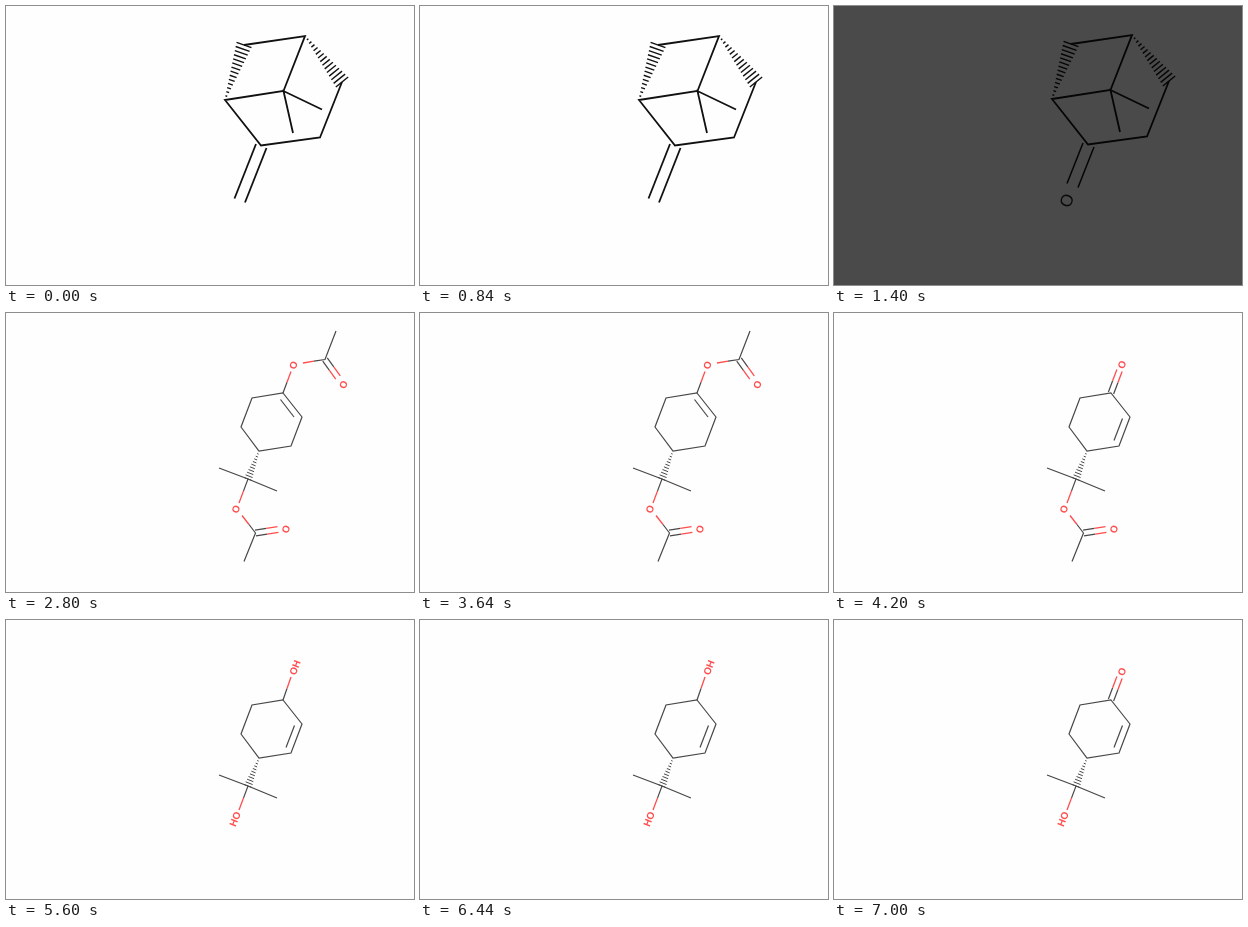
An HTML page with a canvas that plays this animation: 408 px wide and 279 px high, repeating every 8 s.

```html
<!DOCTYPE html>
<html lang="en">
<head>
<meta charset="utf-8">
<title>Molecules</title>
<style>
html, body { margin: 0; width: 100%; height: 100%; overflow: hidden; background: #fefefe; }
canvas { display: block; }
</style>
</head>
<body>
<canvas id="stage" width="408" height="279"></canvas>
<script>
const ctx = document.getElementById('stage').getContext('2d');
const RED = '#ff4d4d', GREY = '#484848';
const TILT = -1.2;

const mix = (a, b, t) => [a[0] + (b[0] - a[0]) * t, a[1] + (b[1] - a[1]) * t];

function normal(a, b) {
  const length = Math.hypot(b[0] - a[0], b[1] - a[1]);
  return [(a[1] - b[1]) / length, (b[0] - a[0]) / length];
}

function path(points, color, width, close) {
  ctx.beginPath();
  points.forEach(p => ctx.lineTo(...p));
  if (close) ctx.closePath();
  ctx.strokeStyle = color;
  ctx.lineWidth = width;
  ctx.stroke();
}

// Bond whose second half is red, drawn once or as a pair of lines.
function redBond(a, b, gap = 0) {
  const [nx, ny] = normal(a, b);
  for (const side of gap ? [-gap, gap] : [0]) {
    const [p, q] = [a, b].map(([x, y]) => [x + nx * side, y + ny * side]);
    const middle = mix(p, q, 0.5);
    path([p, middle], GREY, 1.2);
    path([middle, q], RED, 1.3);
  }
}

// Hashed wedge widening from a to b.
function wedge(a, b, count, half, color, width) {
  const [nx, ny] = normal(a, b);
  for (let i = 1; i <= count; i++) {
    const [x, y] = mix(a, b, i / count), r = 0.4 + half * i / count;
    path([[x - nx * r, y - ny * r], [x + nx * r, y + ny * r]], color, width);
  }
}

function label(text, x, y, color = RED, size = 10, weight = 'bold') {
  ctx.save();
  ctx.translate(x, y);
  ctx.rotate(TILT);
  ctx.font = `${weight} ${size}px "Liberation Sans", sans-serif`;
  ctx.textAlign = 'center';
  ctx.fillStyle = color;
  ctx.fillText(text, 0, size * 0.35);
  ctx.restore();
}

function bicycle(color) {
  const a = [238, 39], b = [299, 30], c = [336, 76], d = [314, 131.5],
        e = [255, 139.5], f = [219, 94], g = [277.5, 85];
  path([a, b, g, f, e, d, c], color, 1.8);
  path([[316, 103.5], g, [287, 127]], color, 1.8);
  wedge(f, a, 14, 7.5, color, 1.4);
  wedge(b, c, 14, 7.5, color, 1.4);
}

function methylene() {
  bicycle('#111');
  path([[250, 138], [228.5, 192.5]], '#111', 1.8);
  path([[260.5, 142], [239, 196.5]], '#111', 1.8);
}

function darkKetone() {
  ctx.fillStyle = '#4a4a4a';
  ctx.fillRect(0, 0, 408, 279);
  ctx.save();
  ctx.translate(-1, -1);
  bicycle('#050505');
  ctx.restore();
  path([[249, 137], [233, 177.5]], '#050505', 1.5);
  path([[260, 141], [244, 181.5]], '#050505', 1.5);
  label('O', 232.5, 194.5, '#0a0a0a', 17, 'normal');
}

const apex = [277, 80], right = [296, 104], low = [285, 133],
      base = [253, 138], left = [235, 114], upper = [246, 85], branch = [242, 166];

function ring(inner) {
  path([apex, right, low, base, left, upper], GREY, 1.2, true);
  path(inner, GREY, 1.2);
  wedge(base, branch, 10, 3.7, GREY, 1);
  path([[213, 155], branch, [271, 178]], GREY, 1.3);
  redBond(branch, [233, 190]);
}

const lowerAlkene = [[288.5, 105.5], [280, 127.5]];

function acetate() {
  const c = [249.5, 220];
  label('O', 230, 196);
  path([[236, 202.5], [243, 211.5]], RED, 1.3);
  path([[243, 211.5], c, [238, 248.5]], GREY, 1.2);
  redBond(c, [272, 216.5], 3);
  label('O', 280, 216);
}

function carbonyl() {
  redBond(apex, [285.5, 57.5], 2.8);
  label('O', 288, 51.5);
}

function diacetate() {
  ring([[274.5, 86.5], [288, 104]]);
  acetate();
  const c = [319, 46.5];
  redBond(apex, [285, 58.5]);
  label('O', 287.5, 52);
  path([[297, 50], [308, 48.2]], RED, 1.3);
  path([[308, 48.2], c, [330, 18]], GREY, 1.2);
  redBond(c, [332, 64.5], 2.8);
  label('O', 337.5, 71.5);
}

function ketoAcetate() {
  ring(lowerAlkene);
  acetate();
  carbonyl();
}

function diol() {
  ring(lowerAlkene);
  redBond(apex, [285, 57]);
  label('OH', 289, 47.5);
  label('HO', 229, 199);
}

function ketoAlcohol() {
  ring(lowerAlkene);
  carbonyl();
  label('HO', 229, 199);
}

const scenes = [methylene, darkKetone, diacetate, ketoAcetate, diol, ketoAlcohol];

function draw() {
  const time = performance.now() % 8000;
  ctx.fillStyle = '#fefefe';
  ctx.fillRect(0, 0, 408, 279);
  scenes[Math.floor(time / 1400)]();
  requestAnimationFrame(draw);
}
draw();
</script>
</body>
</html>
```
